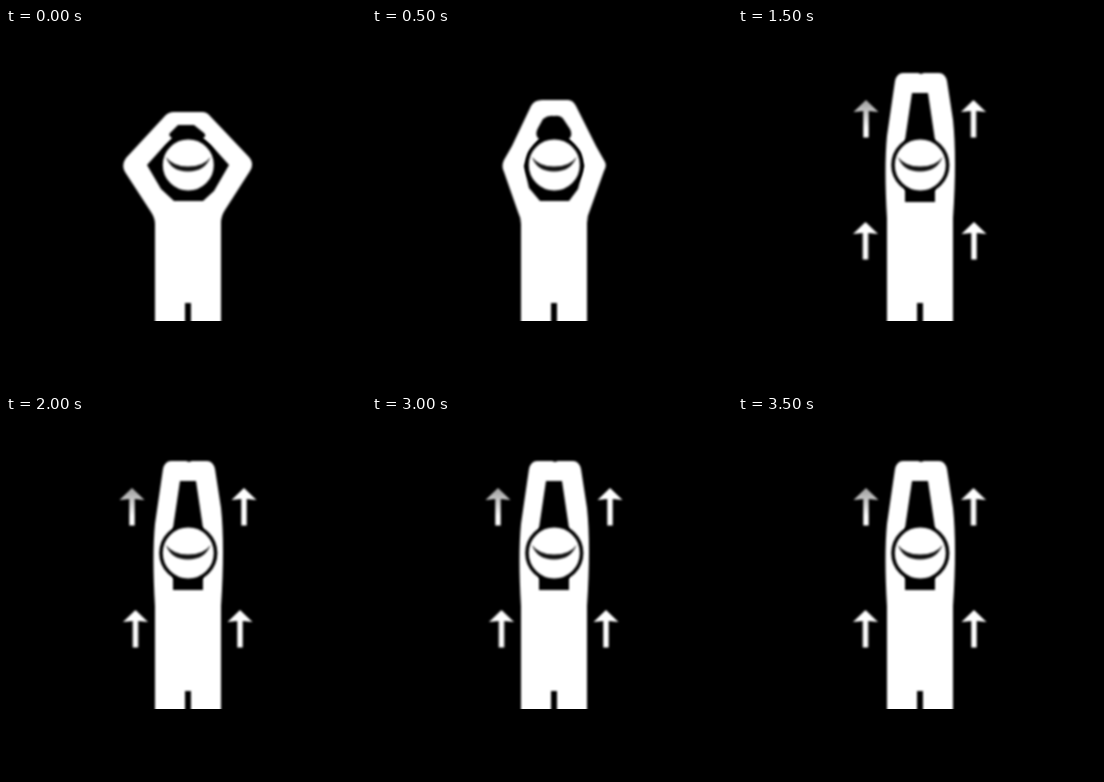
Write an HTML page that moves like this. It is 360x360 px and loops after 4 s.

```html
<!DOCTYPE html>
<html lang="en">
<head>
<meta charset="utf-8">
<title>Arm stretch</title>
<style>
  html, body { margin: 0; width: 100%; height: 100%; overflow: hidden; background: #000; }
  svg { display: block; width: 100vw; height: 100vh; }
  .body { fill: #fff; }

  .pose {
    visibility: hidden;
    animation: show 4s step-end infinite;
    animation-delay: calc(var(--i) * .5s - 4s);
  }
  .final { animation-name: hold; }
  @keyframes show { 0% { visibility: visible; } 12.5%, 100% { visibility: hidden; } }
  @keyframes hold { 0% { visibility: visible; } 62.5%, 100% { visibility: hidden; } }

  .arrow { fill: #fff; animation: sway 1s step-end infinite; }
  @keyframes sway {
    0%, 100% { transform: translate(var(--a), var(--y)); }
    50% { transform: translate(var(--b), var(--y)); }
  }
</style>
</head>
<body>
<svg viewBox="0 0 360 360">
  <defs>
    <filter id="soft" filterUnits="userSpaceOnUse" x="0" y="0" width="360" height="360" color-interpolation-filters="sRGB">
      <feGaussianBlur stdDeviation="1.1"/>
    </filter>
    <filter id="fine" filterUnits="userSpaceOnUse" x="0" y="0" width="360" height="360" color-interpolation-filters="sRGB">
      <feGaussianBlur stdDeviation=".8"/>
    </filter>
    <clipPath id="floor"><path d="M0 0H360V293H0Z"/></clipPath>
    <linearGradient id="fade" x2="0" y2="1">
      <stop offset=".1" stop-color="#aaa"/>
      <stop offset=".75" stop-color="#fff"/>
    </linearGradient>
    <path id="arrow" d="M0 0L12.500 12Q7 11.500 2.700 11V37.500H-2.700V11Q-7 11.500 -12.500 12Z"/>
  </defs>

  <g clip-path="url(#floor)">
    <g class="pose" style="--i:0" filter="url(#soft)">
      <path class="body" d="M168 84H196Q201 84 204 88L242 128Q249 135 244 143L219 182Q215 188 215 195V300H149V196Q149 190 145 184L119 144Q115 137 120 130L158 89Q162 84 168 84Z"/>
      <path d="M141 137L159 117L166 110Q161 107 165 104L172 97H188L198 105Q201 108 197 110L205 117L223 137L208 163L197 173H168L155 161Z"/>
    </g>
    <g class="pose" style="--i:1" filter="url(#soft)">
      <path class="body" d="M170 72H196Q201 72 204 78L224 118L233 134Q235 138 232 143L218 182Q215 188 215 195V300H149V196Q149 190 146 184L132 144Q129 138 132 132L140 118L159 78Q162 72 170 72Z"/>
      <path d="M167 111Q162 107 166 100L171 91Q176 87 182 88Q189 87 192 92L198 101Q201 107 197 111L208 124L212 138L206 161L197 173H168L157 160L152 138L157 124Z"/>
    </g>
    <g class="pose" style="--i:2" filter="url(#soft)">
      <path class="body" d="M166 62H197Q201 62 203 67L215 99Q219 112 219 125V155Q219 172 215 190V300H149V195Q144 172 144 155L146 123L151 98L159 68Q161 62 166 62Z"/>
      <path d="M165 112Q167 99 173 87Q177 79 181 80Q186 80 190 88Q196 98 199 112L203 150L200 161L196 173H168L164 161L160 150Z"/>
    </g>

    <g class="pose final" style="--i:3" filter="url(#soft)">
      <path class="body" d="M165 45H180L183 46L186 45H201Q207 45 209 53L215 92Q219 130 215 190V300H149V190Q146 140 149 108L157 53Q159 45 165 45Z"/>
      <path d="M174 65H190L197 112V174H167V112Z"/>
    </g>

    <path d="M179 275H185V300H179Z" filter="url(#soft)"/>
    <g filter="url(#fine)">
      <circle cx="182.300" cy="137" r="27.300" fill="#fff" stroke="#000" stroke-width="3.600"/>
      <path fill="#111" d="M160 129Q165 143.500 182 143.500Q199 143.500 204.500 129Q198 138.500 182 138.500Q167 138.500 160 129Z"/>
    </g>
  </g>

  <g class="pose final" style="--i:3" filter="url(#fine)">
    <use href="#arrow" class="arrow" style="--a:126px;--b:128px;--y:72px;fill:url(#fade)"/>
    <use href="#arrow" class="arrow" style="--a:238px;--b:235.500px;--y:72px"/>
    <use href="#arrow" class="arrow" style="--a:129.500px;--b:127.500px;--y:194px"/>
    <use href="#arrow" class="arrow" style="--a:234px;--b:236px;--y:194px"/>
  </g>
</svg>
</body>
</html>
```
